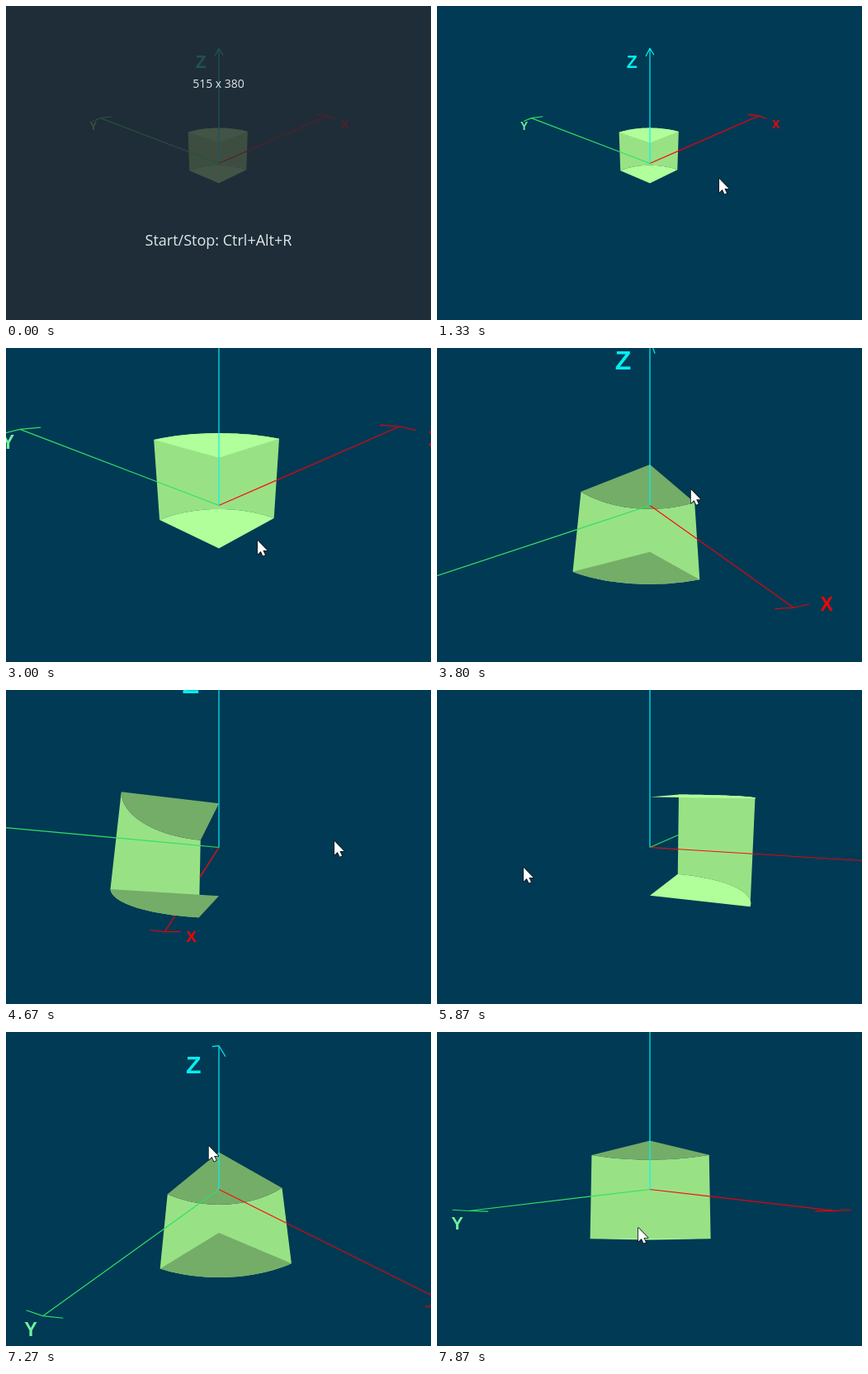
These frames come from a looping animation (515 px wide and 380 px high, 8000 ms). An HTML page with a canvas:

```html
<!DOCTYPE html>
<html lang="en">
<head>
<meta charset="utf-8">
<title>Orbiting a quarter cylinder</title>
<style>
  html, body { margin: 0; width: 100%; height: 100%; overflow: hidden; background: #003a54; }
  canvas { display: block; }
</style>
</head>
<body>
<canvas id="stage" width="515" height="380"></canvas>
<script>
const ctx = document.getElementById('stage').getContext('2d');
const W = 515, H = 380, LOOP = 8000;
const CX = 258, CY = 190.5, FOCAL = 459;
const HALF = 0.5, NEAR = 0.1;

const COLOR = {
  back: '#003a54', lit: '#b0ff9a', wall: '#98e285', shade: '#74ad68',
  x: '#ff0a08', xFar: '#dc0510', y: '#30e065', z: '#00f4f8'
};

// time, azimuth, elevation (degrees)
const ORBIT = [
  [0, 223.1, 24.1], [3030, 223.1, 24.1], [3400, 219, 0], [3870, 213, -32],
  [4300, 190, -42], [4670, 166.3, -22.4], [4800, 165, -13], [5200, 215, 17],
  [5600, 280, 11], [5870, 290.7, 9.5], [6150, 288, 6], [6470, 276, -12],
  [6670, 260.8, -40.5], [7000, 243, -46], [7330, 229, -34], [7870, 225.4, -6.7]
];
// time, log of the camera distance
const ZOOM = [
  [1330, Math.log(8.55)], [2130, Math.log(5.37)], [2700, Math.log(3.85)], [4000, Math.log(3.8)]
];
// time, pointer x, pointer y
const POINTER = [
  [1330, 342, 209], [2600, 342, 209], [3000, 305, 233], [3400, 300, 207],
  [3870, 310, 168], [4300, 340, 160], [4670, 398, 183], [4800, 400, 192],
  [5200, 270, 215], [5600, 125, 217], [5870, 105, 215], [6150, 110, 205],
  [6470, 165, 140], [6670, 221, 74], [7000, 240, 85], [7330, 246, 150], [7870, 244, 237]
];

// Smooth interpolation that never overshoots a key.
function track(keys, t, col) {
  const last = keys.length - 1;
  if (t <= keys[0][0]) return keys[0][col];
  if (t >= keys[last][0]) return keys[last][col];
  const i = keys.findIndex(k => k[0] > t) - 1;
  const slope = j => (keys[j + 1][col] - keys[j][col]) / (keys[j + 1][0] - keys[j][0]);
  const tangent = j => {
    if (j === 0) return slope(0);
    if (j === last) return slope(last - 1);
    const a = slope(j - 1), b = slope(j);
    return a * b <= 0 ? 0 : 2 * a * b / (a + b);
  };
  const d = keys[i + 1][0] - keys[i][0], u = (t - keys[i][0]) / d, v = 1 - u;
  return keys[i][col] * v * v * (1 + 2 * u) + keys[i + 1][col] * u * u * (3 - 2 * u)
    + d * u * v * (v * tangent(i) - u * tangent(i + 1));
}

function makeCamera(t) {
  const a = track(ORBIT, t, 1) * Math.PI / 180, e = track(ORBIT, t, 2) * Math.PI / 180;
  const dist = Math.exp(track(ZOOM, t, 1));
  const ca = Math.cos(a), sa = Math.sin(a), ce = Math.cos(e), se = Math.sin(e);
  const view = ([x, y, z]) => [
    y * ca - x * sa,
    z * ce - se * (x * ca + y * sa),
    dist - ce * (x * ca + y * sa) - z * se
  ];
  return { view, height: dist * se };
}

const toScreen = ([r, u, d]) => [CX + FOCAL * r / d, CY - FOCAL * u / d];

function line(cam, p, q, color, width = 1.2) {
  let a = cam.view(p), b = cam.view(q);
  if (a[2] < NEAR && b[2] < NEAR) return;
  if (a[2] < NEAR) [a, b] = [b, a];
  if (b[2] < NEAR) {
    const k = (a[2] - NEAR) / (a[2] - b[2]);
    b = a.map((v, i) => v + (b[i] - v) * k);
  }
  ctx.strokeStyle = color;
  ctx.lineWidth = width;
  ctx.beginPath();
  ctx.moveTo(...toScreen(a));
  ctx.lineTo(...toScreen(b));
  ctx.stroke();
}

function fill(cam, points, color) {
  ctx.fillStyle = color;
  ctx.beginPath();
  points.forEach(p => ctx.lineTo(...toScreen(cam.view(p))));
  ctx.closePath();
  ctx.fill();
}

function label(cam, text, at, dr, du, color) {
  const [r, u, d] = cam.view(at);
  if (d < NEAR) return;
  const [x, y] = toScreen([r + dr, u + du, d]);
  const size = 0.35 * FOCAL / d;
  ctx.font = `bold ${size}px "Liberation Sans", Arial, sans-serif`;
  ctx.textAlign = 'center';
  ctx.textBaseline = 'alphabetic';
  ctx.fillStyle = color;
  ctx.fillText(text, x, y + size * 0.345);
}

function arc(z) {
  return Array.from({ length: 33 }, (_, i) => {
    const a = i / 32 * Math.PI / 2;
    return [Math.cos(a), Math.sin(a), z];
  });
}

function drawScene(cam) {
  const origin = [0, 0, 0];

  // Parts of the floor axes beyond the wall
  line(cam, [1, 0, 0], [5, 0, 0], COLOR.xFar);
  line(cam, [0, 1, 0], [0, 5, 0], COLOR.y);
  for (const s of [-0.33, 0.33]) {
    line(cam, [5, 0, 0], [4.88, s, 0], COLOR.xFar);
    line(cam, [0, 5, 0], [s, 4.88, 0], COLOR.y);
  }
  label(cam, 'X', [5, -0.95, 0], -0.355, -0.07, '#f00505');
  label(cam, 'Y', [0, 5, 0], -0.22, -0.24, '#6ff0a0');

  // Open quarter cylinder
  fill(cam, [...arc(HALF), ...arc(-HALF).reverse()], COLOR.wall);
  const caps = cam.height > 0 ? [-HALF, HALF] : [HALF, -HALF];
  for (const z of caps) {
    fill(cam, [[0, 0, z], ...arc(z)], cam.height > z ? COLOR.lit : COLOR.shade);
  }

  line(cam, origin, [0, 1, 0], COLOR.y);
  line(cam, origin, [1, 0, 0], COLOR.x);
  line(cam, origin, [0, 0, 2.5], COLOR.z);
  for (const s of [-0.12, 0.12]) line(cam, [0, 0, 2.5], [s, 0, 2.36], COLOR.z);
  label(cam, 'Z', [0, 0, 2.5], -0.355, -0.265, '#00f0f0');
}

const ARROW = [[0, 0], [0, 16.5], [3.8, 13], [6.4, 18.6], [9, 17.4], [6.4, 12], [11.6, 12]];

function drawPointer(x, y) {
  ctx.beginPath();
  ARROW.forEach(([px, py]) => ctx.lineTo(x + px, y + py));
  ctx.closePath();
  ctx.lineJoin = 'round';
  ctx.lineWidth = 1.6;
  ctx.strokeStyle = '#0b1016';
  ctx.stroke();
  ctx.fillStyle = '#ffffff';
  ctx.fill();
}

function drawNotice(opacity) {
  ctx.globalAlpha = 0.8 * opacity;
  ctx.fillStyle = '#272a31';
  ctx.fillRect(0, 0, W, H);
  ctx.globalAlpha = opacity;
  ctx.fillStyle = '#e0e8ea';
  ctx.textAlign = 'center';
  ctx.textBaseline = 'alphabetic';
  ctx.font = '14px "Open Sans", "Noto Sans", sans-serif';
  ctx.fillText('515 x 380', 257.5, 99);
  ctx.font = '18px "Open Sans", "Noto Sans", sans-serif';
  ctx.fillText('Start/Stop: Ctrl+Alt+R', 257.5, 290);
  ctx.globalAlpha = 1;
}

function draw(t) {
  ctx.fillStyle = COLOR.back;
  ctx.fillRect(0, 0, W, H);
  drawScene(makeCamera(t));
  if (t >= 1325) drawPointer(track(POINTER, t, 1), track(POINTER, t, 2));
  const notice = t < 70 ? 1 : Math.max(0, 1 - t / 420);
  if (notice > 0) drawNotice(notice);
}

const start = performance.now();
function tick() {
  draw((performance.now() - start) % LOOP);
  requestAnimationFrame(tick);
}
tick();
</script>
</body>
</html>
```
